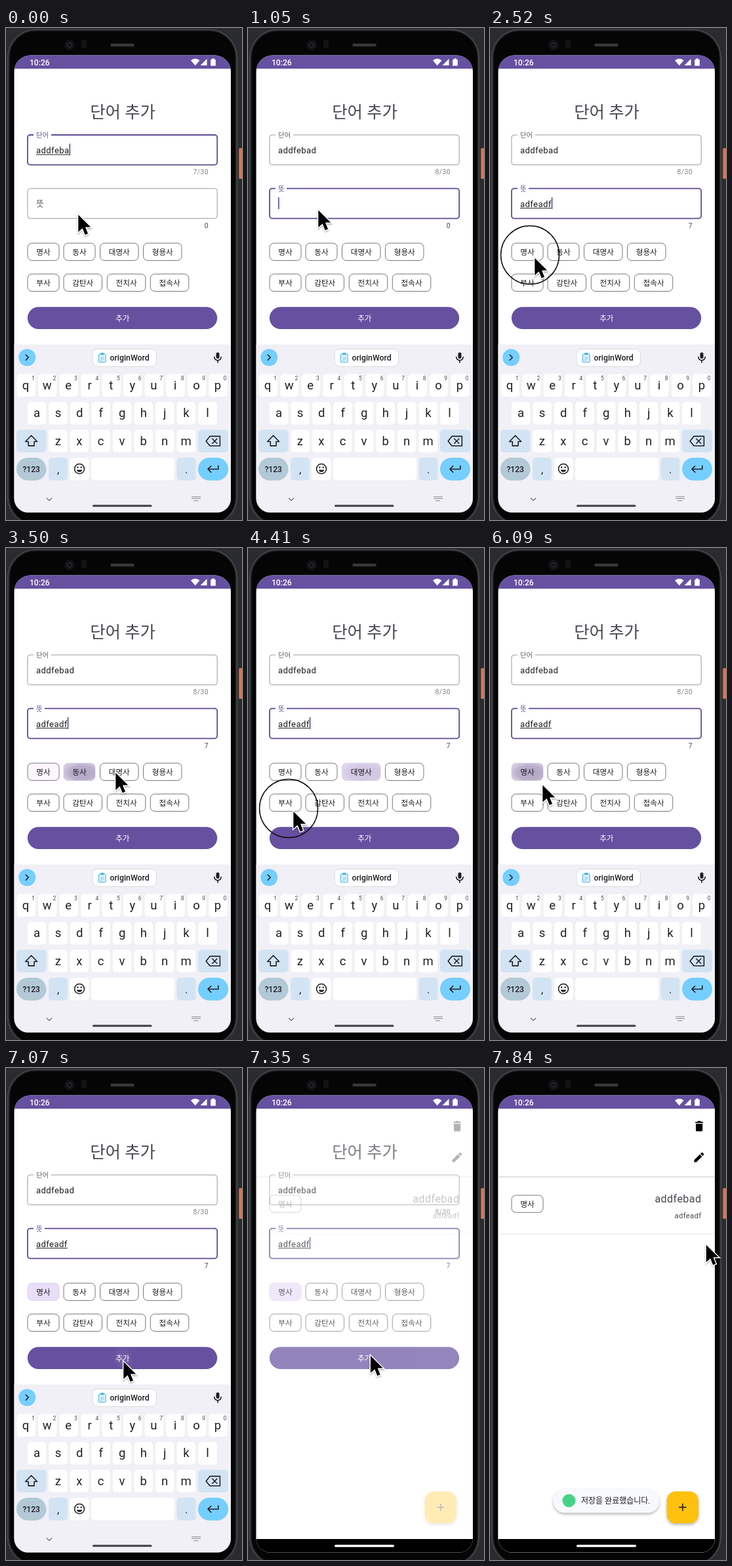
Write an HTML page that moves like this. It is 360 px wide and 750 px high and loops after 8 s.

```html
<!DOCTYPE html>
<html lang="ko">
<head>
<meta charset="utf-8">
<title>단어 추가</title>
<style>
  html, body { margin: 0; width: 100%; height: 100%; overflow: hidden; background: #2a2b2e; }
  svg { display: block; width: 360px; height: 750px; }
  text { font-family: Roboto, "Noto Sans CJK KR", "Noto Sans CJK", sans-serif; white-space: pre; }
  .line { fill: none; stroke: #1f1f22; stroke-width: 1.6; stroke-linecap: round; stroke-linejoin: round; }
</style>
</head>
<body>
<svg id="stage" viewBox="0 0 360 750" xmlns="http://www.w3.org/2000/svg"></svg>
<script>
const LOOP = 8000;
const PURPLE = '#6650a0', FOCUS = '#5d4a90', INK = '#1d1b20', SOFT = '#49454f';

// ---- markup helpers ----
const rect = (x, y, w, h, r, fill, more = '') =>
  `<rect x="${x}" y="${y}" width="${w}" height="${h}" rx="${r}" fill="${fill}" ${more}/>`;
const circle = (x, y, r, fill, more = '') => `<circle cx="${x}" cy="${y}" r="${r}" fill="${fill}" ${more}/>`;
const path = (d, more = 'class="line"') => `<path d="${d}" ${more}/>`;
const text = (s, x, y, size, fill, more = '') =>
  `<text x="${x}" y="${y}" font-size="${size}" fill="${fill}" ${more}>${s}</text>`;
const MID = 'text-anchor="middle"', END = 'text-anchor="end"';

// ---- chips ----
const chips = [
  ['명사', 33, 328, 48], ['동사', 88, 328, 48], ['대명사', 143.5, 328, 58.5], ['형용사', 209.5, 328, 58.5],
  ['부사', 33, 375, 48], ['감탄사', 88, 375, 58.5], ['전치사', 154.3, 375, 58.5], ['접속사', 220.3, 375, 58.5]
];
const chipMarkup = ([label, x, y, w], i) =>
  rect(x, y, w, 26.4, 6.5, '#fff', `id="chip${i}" stroke="#79747e" stroke-width="1"`) +
  rect(x, y, w, 26.4, 6.5, 'url(#ripple)', `id="press${i}" opacity="0"`) +
  text(label, x + w / 2, y + 17.6, 11.6, INK, MID);

// ---- fields ----
const field = (id, y) =>
  rect(32.9, y, 289.3, 45.6, 4, '#fff', `id="${id}Box"`) +
  rect(42, y - 2, 27, 4, 0, '#fff', `id="${id}Gap"`) +
  `<text id="${id}Label"/>` +
  text('', 46, y + 28, 13.1, INK, `id="${id}Text" letter-spacing=".4"`) +
  rect(46, y + 29.5, 0, 1, 0, INK, `id="${id}Line"`) +
  rect(46, y + 13.3, 1.6, 18, 0, FOCUS, `id="${id}Caret"`) +
  text('', 309, y + 60, 10.4, '#85818a', `id="${id}Count" letter-spacing=".4" ${END}`);

// ---- keyboard ----
const PITCH = 32.55, TINT = '#d2e4f4', SKY = '#74cefe';
const keyRow = (letters, x0, y, digits = '') => [...letters].map((c, i) => {
  const x = x0 + i * PITCH;
  return rect(x - 14.3, y, 28.6, 34.4, 5, '#fff') +
    text(c, x - (digits ? .5 : 0), y + 23, 18.5, '#202124', MID) +
    (digits ? text(digits[i], x + 10.7, y + 9.5, 8.5, '#44474c', MID) : '');
}).join('');

const keyboard = () =>
  rect(12, 482.5, 332, 257, 0, '#f0f0f6') +
  circle(32.2, 502.3, 13, SKY) + path('M30.2 498.3l4 4-4 4') +
  rect(132, 489.5, 97.5, 26.5, 8, '#fff', 'stroke="#d9dae0"') +
  rect(141.5, 497, 10.5, 12.5, 1.5, '#e2f4ff', 'stroke="#4fb6e2" stroke-width="1.2"') +
  rect(144, 495, 5.5, 3.5, 1, '#4fb6e2') +
  path('M144 502h5.5M144 504.5h5.5M144 507h3.5', 'stroke="#4fb6e2" stroke-width=".8"') +
  text('originWord', 158.5, 507.3, 12.3, INK, 'font-weight="500"') +
  rect(320.5, 494.5, 5, 9.5, 2.5, INK) + path('M317.8 501.5a5.2 5.2 0 0 0 10.4 0M323 507v3') +
  keyRow('qwertyuiop', 30.6, 527.5, '1234567890') +
  keyRow('asdfghjkl', 47, 570) +
  keyRow('zxcvbnm', 79.4, 612.5) +
  rect(16, 612.5, 45.5, 34.4, 5, TINT) +
  path('M38.6 621.2l-9 9.3h4.6v6.4h8.8v-6.4h4.6z') +
  rect(293, 612.5, 46, 34.4, 5, TINT) +
  path('M311 622.4h15.4v14.6h-15.4l-5.8-7.3zM314.8 626.2l7 7m0-7l-7 7') +
  rect(16, 655, 45.5, 34.8, 17.4, '#b2c9d7') + text('?123', 38.7, 677, 12, INK, MID + ' font-weight="500"') +
  rect(65, 655, 29, 34.6, 5, TINT) + text(',', 79.5, 679, 16, INK, MID) +
  rect(97.5, 655, 29, 34.6, 5, '#fff') +
  circle(112, 672, 7.5, 'none', 'class="line"') + path('M107.8 673.4h8.4a4.3 4.3 0 0 1-8.4 0z', 'fill="#1f1f22"') +
  circle(109.3, 669.8, 1.2, INK) + circle(114.7, 669.8, 1.2, INK) +
  rect(130, 655, 127, 34.6, 5, '#fff') +
  rect(260.5, 655, 29, 34.6, 5, TINT) + text('.', 275, 679, 16, INK, MID) +
  rect(293, 655, 46, 34.8, 17.4, SKY) + path('M323.8 667.3v5.2h-15.8m4.6-4.6l-4.6 4.6 4.6 4.6') +
  path('M62 716.5l4 4 4-4', 'fill="none" stroke="#66676b" stroke-width="1.2"') +
  rect(132, 726.8, 90.5, 3.2, 1.6, '#4b4b4f') +
  path('M283.5 714.6h13M283.5 717.4h13M286.5 720.6h7', 'stroke="#77787c" stroke-width="1.3" stroke-dasharray="1.6 .7"');

// ---- screens ----
const form = () =>
  text('단어 추가', 178, 136.6, 25.4, SOFT, MID) +
  field('word', 163) + field('mean', 244.7) +
  chips.map(chipMarkup).join('') +
  rect(32.8, 425.2, 289.4, 33.8, 16.9, PURPLE) +
  `<g clip-path="url(#buttonClip)">${circle(178, 442, 10, 'url(#glow)', 'id="glint"')}</g>` +
  text('추가', 177.8, 446.6, 11.6, '#fff', MID);

const list = () =>
  rect(12, 62, 332, 680, 0, '#fff') +
  path('M313.2 82h3l1-1.3h3.8l1 1.3h3v1.8h-11.8zM314 85h10.2v10a1.6 1.6 0 0 1-1.6 1.6h-7a1.6 1.6 0 0 1-1.6-1.6z', 'fill="#000"') +
  path('M311.5 140.3v3.3h3.3l8.7-8.7-3.3-3.3zM321.1 130.7l3.3 3.3 1.7-1.7a1 1 0 0 0 0-1.3l-2-2a1 1 0 0 0-1.3 0z', 'fill="#000"') +
  rect(12, 165.2, 332, 1.6, 0, '#dcdadf') +
  rect(33, 194, 48, 26.2, 6.5, '#fff', 'stroke="#79747e"') + text('명사', 57, 211.6, 11.6, INK, MID) +
  text('addfebad', 322.4, 204.8, 16.1, SOFT, END + ' letter-spacing=".4"') +
  text('adfeadf', 322.4, 228.8, 11.3, SOFT, END + ' letter-spacing=".3"') +
  rect(12, 252.5, 332, 1, 0, '#e4e2e7') +
  rect(269.6, 645.5, 48.4, 48.6, 13.5, '#fec10d', 'filter="url(#shadow)"') +
  path('M288.3 669.6h11.2M293.9 664v11.2', 'stroke="#222" stroke-width="1.6"');

const toast = () =>
  rect(96.5, 642, 161.7, 36, 18, '#f8f9fd', 'filter="url(#shadow)"') +
  circle(120.5, 659.5, 10, '#45d487') +
  text('저장을 완료했습니다.', 139, 664, 12, INK);

const phone = () =>
  rect(1.5, 1.5, 352, 757, 44, '#404144') +
  rect(4, 3.5, 347, 753, 41, '#1b1b1d') +
  rect(6, 5, 343.5, 750, 39, '#050506') +
  rect(355.3, 183, 4.7, 47, 1.5, '#e4714c') +
  circle(97, 26, 8, '#121215') + circle(97, 26, 4, '#222328') + circle(97, 26, 2, '#0b0b0e') +
  rect(115, 18, 8, 13, 2, '#121214') +
  rect(159, 23.5, 37, 5, 2.5, '#2c2c2f') +
  path('M161 26h33', 'stroke="#505054" stroke-width="2" stroke-dasharray="1 1"');

const statusBar = () =>
  rect(12, 40, 332, 22, 0, PURPLE) +
  text('10:26', 36, 56.6, 12.1, '#fff', 'font-weight="500"') +
  path('M282 49.5a9.5 9.5 0 0 1 13.4 0l-6.7 7.8z', 'fill="#fff"') +
  path('M306.5 47v10h-10z', 'fill="#fff"') +
  path('M312.5 48.3h2v-1.5h3v1.5h2v9h-7z', 'fill="#fff" stroke="#fff" stroke-width=".6" stroke-linejoin="round"');

const stage = document.getElementById('stage');
stage.innerHTML = `
  <defs>
    <clipPath id="screenClip"><path d="M12.5 66.5a25 25 0 0 1 25-25H318a25 25 0 0 1 25 25V717.5a21 21 0 0 1-21 21H33.5a21 21 0 0 1-21-21z"/></clipPath>
    <clipPath id="buttonClip">${rect(32.8, 425.2, 289.4, 33.8, 16.9, '#000')}</clipPath>
    <radialGradient id="ripple" cx=".58" cy=".55" r=".62">
      <stop offset="0" stop-color="#b0a6c4"/><stop offset=".65" stop-color="#b9afcb"/><stop offset="1" stop-color="#d3cbe1"/>
    </radialGradient>
    <radialGradient id="glow">
      <stop offset="0" stop-color="#fff"/><stop offset="1" stop-color="#fff" stop-opacity="0"/>
    </radialGradient>
    <filter id="shadow" x="-20%" y="-30%" width="140%" height="170%">
      <feDropShadow dx="0" dy="2.2" stdDeviation="2.2" flood-color="#000" flood-opacity=".3"/>
    </filter>
    <filter id="soft" x="-30%" y="-20%" width="170%" height="150%">
      <feDropShadow dx="0" dy="1.5" stdDeviation="1.2" flood-color="#000" flood-opacity=".35"/>
    </filter>
  </defs>
  ${phone()}
  <g clip-path="url(#screenClip)">
    ${rect(12, 40, 332, 700, 0, '#fff')}
    <g id="form">${form()}</g>
    <g id="list">${list()}</g>
    ${rect(12, 718, 332, 22, 0, '#000')}${rect(132, 726.8, 91, 3.4, 1.7, '#fff')}
    <g id="toast">${toast()}</g>
    <g id="keyboard">${keyboard()}</g>
    ${statusBar()}
  </g>
  ${circle(0, 0, 44.5, 'none', 'id="ring" stroke="#0c0c0c" stroke-width="1.5"')}
  <path id="pointer" d="M1.3 2.8V28.9L7.6 23.2L11.7 33.2L16 31.4L12 21.6H20.2Z" fill="#000" stroke="#fff"
    stroke-width="2.8" stroke-linejoin="miter" paint-order="stroke" filter="url(#soft)"/>`;

// ---- motion ----
const $ = Object.fromEntries([...stage.querySelectorAll('[id]')].map(e => [e.id, e]));
const set = (el, attrs) => { for (const k in attrs) el.setAttribute(k, attrs[k]); };
const span = (t, a, b) => Math.min(1, Math.max(0, (t - a) / (b - a)));
const smooth = p => p * p * (3 - 2 * p);
const linear = p => p;
const mix = (a, b, p) => a + (b - a) * p;

function track(points, t, ease = smooth) {
  const i = points.findIndex(p => p[0] > t);
  if (i === 0) return points[0].slice(1);
  if (i < 0) return points[points.length - 1].slice(1);
  const a = points[i - 1], b = points[i], p = ease((t - a[0]) / (b[0] - a[0]));
  return a.slice(1).map((v, k) => mix(v, b[k + 1], p));
}

const pointerPath = [
  [0, 109, 282], [280, 105, 280], [560, 105, 280], [700, 109, 279], [910, 109, 279], [1050, 106, 275],
  [1260, 106, 275], [1960, 67, 359], [2240, 67, 352], [2380, 67, 348], [2800, 67, 348], [3000, 124, 343],
  [3220, 127, 343], [3500, 166, 340], [3850, 169, 341], [4060, 226, 352], [4160, 216, 378], [4400, 68, 399],
  [4620, 68, 399], [4830, 200, 399], [5030, 205, 398], [5170, 288, 398], [5320, 219, 395], [5530, 67, 348],
  [5950, 67, 349], [6640, 178, 438], [6790, 178, 445], [7280, 178, 445], [7800, 328.5, 267]
];
const clicks = [[280, 540], [700, 910], [2515, 2730], [3010, 3220], [3570, 3780], [4410, 4620], [4830, 5040], [5530, 5740], [6790, 7000]];
// chip index, press time; each choice lasts until the next one
const picks = [[0, 2600], [1, 3130], [2, 3680], [4, 4510], [6, 5000], [0, 5640]];

const pressFade = [[0, 0], [170, .75], [330, 1], [520, 1], [900, 0]];
const releaseColor = [[0, 232, 222, 248], [300, 235, 231, 236], [370, 251, 246, 251], [450, 255, 255, 255]];
const MEANING = 'adfeadf';

function drawField(id, value, count, focused, floated, caretOn, y) {
  const t = $[id + 'Text'];
  if (t.textContent !== value) t.textContent = value;
  const width = value ? t.getComputedTextLength() : 0;
  set($[id + 'Box'], { stroke: focused ? FOCUS : '#9b989f', 'stroke-width': focused ? 1.8 : 1 });
  set($[id + 'Line'], { width: focused ? width : 0 });
  set($[id + 'Caret'], { x: 46 + width, opacity: focused && caretOn ? 1 : 0 });
  set($[id + 'Gap'], { width: (id === 'word' ? 27 : 17) * floated });
  set($[id + 'Label'], {
    x: 46, y: mix(y + 26.8, y + 3.8, floated), 'font-size': mix(12.85, 10.3, floated),
    fill: focused ? FOCUS : '#5f5b66'
  });
  $[id + 'Count'].textContent = count;
}

function drawChips(t) {
  chips.forEach((_, i) => {
    let color = [255, 255, 255], press = 0, chosen = false;
    picks.forEach(([chip, start], k) => {
      const end = k + 1 < picks.length ? picks[k + 1][1] : Infinity;
      if (chip !== i || t < start) return;
      chosen = t < end;
      press = chosen ? track(pressFade, t - start, linear)[0] : 0;
      const q = span(t, start, start + 170);
      color = chosen ? [mix(255, 232, q), mix(255, 222, q), mix(255, 248, q)] : track(releaseColor, t - end, linear);
    });
    set($['chip' + i], { fill: `rgb(${color.map(Math.round)})`, stroke: chosen ? '#ddd3ee' : '#79747e' });
    set($['press' + i], { opacity: press });
  });
}

function render(t) {
  const second = t >= 480;
  const typed = Math.min(7, Math.max(0, Math.floor((t - 1260) / 120) + 1));
  const blinkStart = t < 480 ? 0 : t < 1260 ? 560 : t < 2100 ? t : 2100;
  const caretOn = Math.floor(Math.max(0, t - blinkStart) / 500) % 2 === 0;
  const word = t < 70 ? 'addfeba' : 'addfebad';

  drawField('word', word, word.length + '/30', !second, 1, caretOn, 163);
  drawField('mean', MEANING.slice(0, typed), String(typed), second, smooth(span(t, 430, 560)), caretOn, 244.7);
  $.meanCount.setAttribute('fill', SOFT);
  drawChips(t);

  const glow = span(t, 6850, 7350);
  set($.glint, { r: mix(8, 30, glow), opacity: t < 6850 ? 0 : .2 * (1 - glow) });

  const hide = smooth(span(t, 7140, 7370));
  set($.keyboard, { transform: `translate(0 ${262 * hide})`, opacity: 1 - hide * .5 });
  set($.list, { opacity: smooth(span(t, 7140, 7720)) });
  set($.toast, { opacity: smooth(span(t, 7380, 7700)) });

  const [x, y] = track(pointerPath, t);
  set($.pointer, { transform: `translate(${x} ${y})` });
  const down = clicks.some(([a, b]) => t >= a && t < b);
  set($.ring, { cx: x - 6, cy: y - 2, opacity: down ? 1 : 0 });
}

$.wordLabel.textContent = '단어';
$.meanLabel.textContent = '뜻';
const begin = performance.now();
function tick() {
  render((performance.now() - begin) % LOOP);
  requestAnimationFrame(tick);
}
tick();
</script>
</body>
</html>
```
